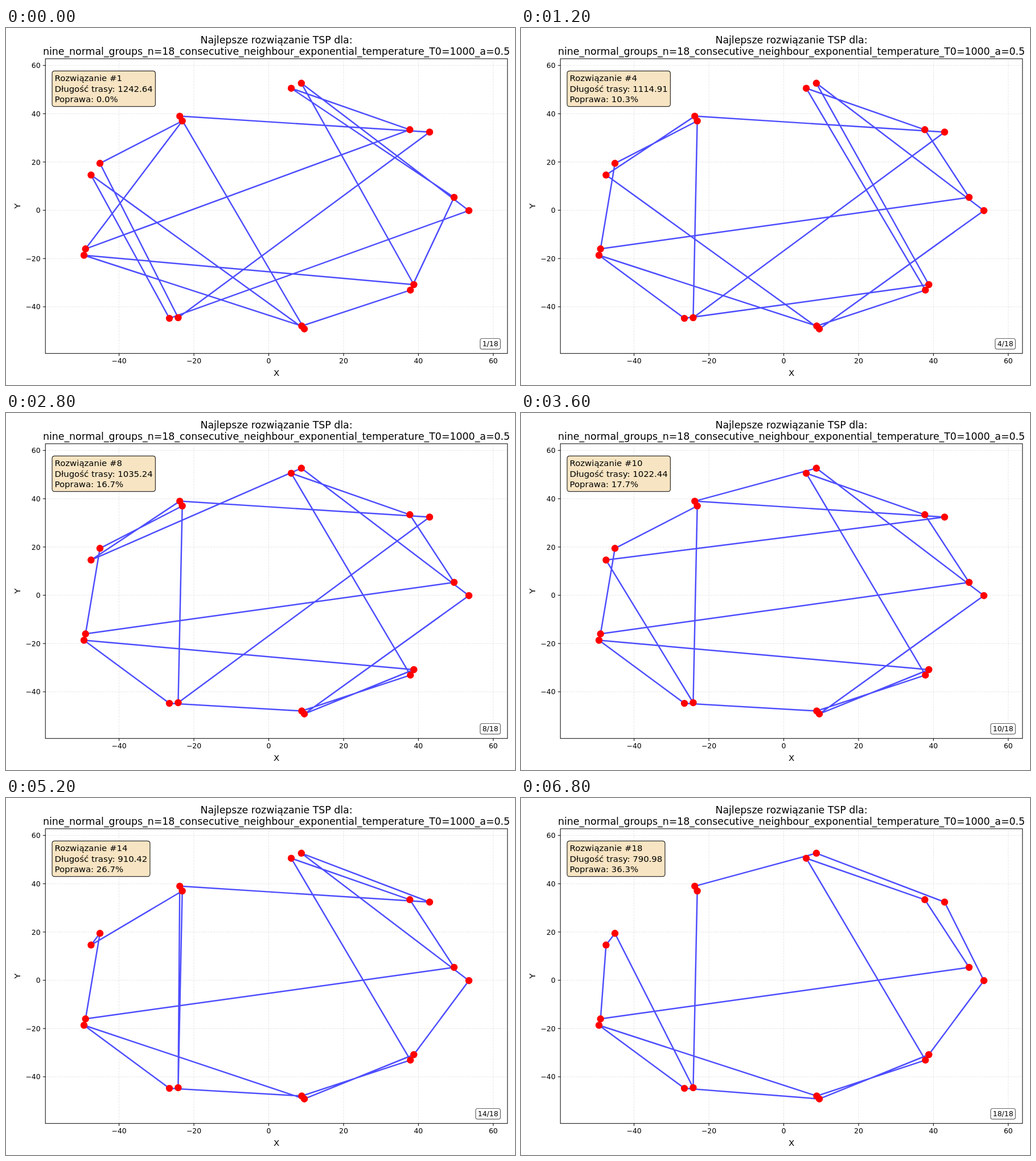
Animation of 894 by 626 pixels, one loop 7.2 s. Source, as an HTML page:

```html
<!DOCTYPE html>
<html lang="pl">
<head>
<meta charset="utf-8">
<style>
  html, body { margin: 0; width: 100%; height: 100%; overflow: hidden; background: #fff; }
  svg { display: block; width: 894px; height: 626px; font-family: "DejaVu Sans", sans-serif; }
</style>
</head>
<body>
<svg id="stage" viewBox="0 0 894 626"></svg>
<script>
const STEP = 400;
const stage = document.getElementById('stage');

const cities = {
  A: [305.2, 154.6], B: [309.6, 163], C: [165, 237.3], D: [149.4, 257.8], E: [139.7, 387.3], F: [137, 398.5],
  G: [287, 509.1], H: [302.4, 508], I: [519.4, 522.5], J: [524, 527.7], K: [710.3, 459.6], L: [716.3, 450],
  M: [813, 320.2], N: [787, 297], O: [744, 182.5], P: [709.3, 178.3], Q: [501, 105.7], R: [518.8, 96.8]
};

// Each move shifts the first city of a group behind the others of that group.
const moves = 'BC JD GMRL+NQP MR JR GF JM AD OD HD OA BD JL BH CD OR FG'.split(' ');
const lengths = [1242.64, 1233.54, 1146.68, 1114.91, 1096.1, 1075.07, 1067.64, 1035.24, 1027.78,
  1022.44, 983.89, 969.83, 965.01, 910.42, 859.52, 858.28, 791.32, 790.98];

const tours = ['EBCHOAJDGMRLFIKNQP'];
for (const move of moves) {
  tours.push(move.split('+').reduce(
    (tour, group) => tour.replace(group, group.slice(1) + group[0]), tours[tours.length - 1]));
}

function add(tag, attrs, text = '') {
  const node = document.createElementNS('http://www.w3.org/2000/svg', tag);
  for (const key in attrs) node.setAttribute(key, attrs[key]);
  node.textContent = text;
  stage.appendChild(node);
  return node;
}

const label = (x, y, size, text, anchor = 'middle', more = {}) =>
  add('text', { x, y, 'font-size': size, 'text-anchor': anchor, ...more }, text);

// Rounded box with quadratic corners
const boxPath = (l, t, r, b, c) =>
  `M${l + c} ${t}H${r - c}Q${r} ${t} ${r} ${t + c}V${b - c}Q${r} ${b} ${r - c} ${b}` +
  `H${l + c}Q${l} ${b} ${l} ${b - c}V${t + c}Q${l} ${t} ${l + c} ${t}Z`;

const LEFT = 69.2, TOP = 53.9, RIGHT = 880.8, BOTTOM = 570.7;
const SMALL = 12.42, MEDIUM = 14.9, LARGE = 17.38;
const tickText = v => String(v).replace('-', '\u2212');

function tick(d, grid) {
  add('path', { d: grid, stroke: '#b0b0b0', 'stroke-opacity': 0.3, 'stroke-dasharray': '3.68 1.59' });
  add('path', { d, stroke: '#000' });
}

for (let v = -40; v <= 60; v += 20) {
  const x = 461.5 + 6.572 * v, y = 319.6 - 4.232 * v;
  tick(`M${x} ${BOTTOM}v4.35`, `M${x} ${BOTTOM}V${TOP}`);
  tick(`M${LEFT} ${y}h-4.35`, `M${LEFT} ${y}H${RIGHT}`);
  label(x, 588.3, SMALL, tickText(v));
  label(60.6, y + 4.6, SMALL, tickText(v), 'end');
}

const route = add('path', { fill: 'none', stroke: '#4d4dff', 'stroke-width': 2.48, 'stroke-linejoin': 'round' });
add('rect', { x: LEFT, y: TOP, width: RIGHT - LEFT, height: BOTTOM - TOP, fill: 'none', stroke: '#000' });
for (const [cx, cy] of Object.values(cities)) add('circle', { cx, cy, r: 6.2, fill: '#f00' });

label(475, 27, LARGE, 'Najlepsze rozwiązanie TSP dla:');
label(475, 46.8, LARGE, 'nine_normal_groups_n=18_consecutive_neighbour_exponential_temperature_T0=1000_a=0.5');
label(475, 609.5, MEDIUM, 'X');
label(0, 0, MEDIUM, 'Y', 'middle', { transform: 'translate(25 312.3) rotate(-90)' });

const infoBox = add('path', {
  fill: '#f5deb3', 'fill-opacity': 0.8, stroke: '#000', 'stroke-opacity': 0.8, 'stroke-width': 1.24
});
const info = [93, 111.6, 130].map(y => label(85.5, y, MEDIUM, '', 'start'));
const countBox = add('path', {
  fill: '#fff', 'fill-opacity': 0.8, stroke: '#000', 'stroke-opacity': 0.6, 'stroke-width': 1.24
});
const count = label(864.6, 558, SMALL, '', 'end');

let shown = -1;
function draw(index) {
  if (index === shown) return;
  shown = index;
  const length = lengths[index], number = index + 1;
  route.setAttribute('d', 'M' + [...tours[index]].map(c => cities[c].join(' ')).join('L') + 'Z');
  info[0].textContent = `Rozwiązanie #${number}`;
  info[1].textContent = `Długość trasy: ${length.toFixed(2)}`;
  info[2].textContent = `Poprawa: ${((1 - length / lengths[0]) * 100).toFixed(1)}%`;
  infoBox.setAttribute('d', boxPath(81, 75.3, length >= 1000 ? 262.4 : 252.9, 137.6, 4.47));
  count.textContent = `${number}/${tours.length}`;
  countBox.setAttribute('d', boxPath(number < 10 ? 832.8 : 824.9, 544.5, 868.4, 563.2, 3.73));
}

const start = performance.now();
function tickFrame() {
  draw(Math.floor((performance.now() - start) / STEP) % tours.length);
  requestAnimationFrame(tickFrame);
}
tickFrame();
</script>
</body>
</html>
```
